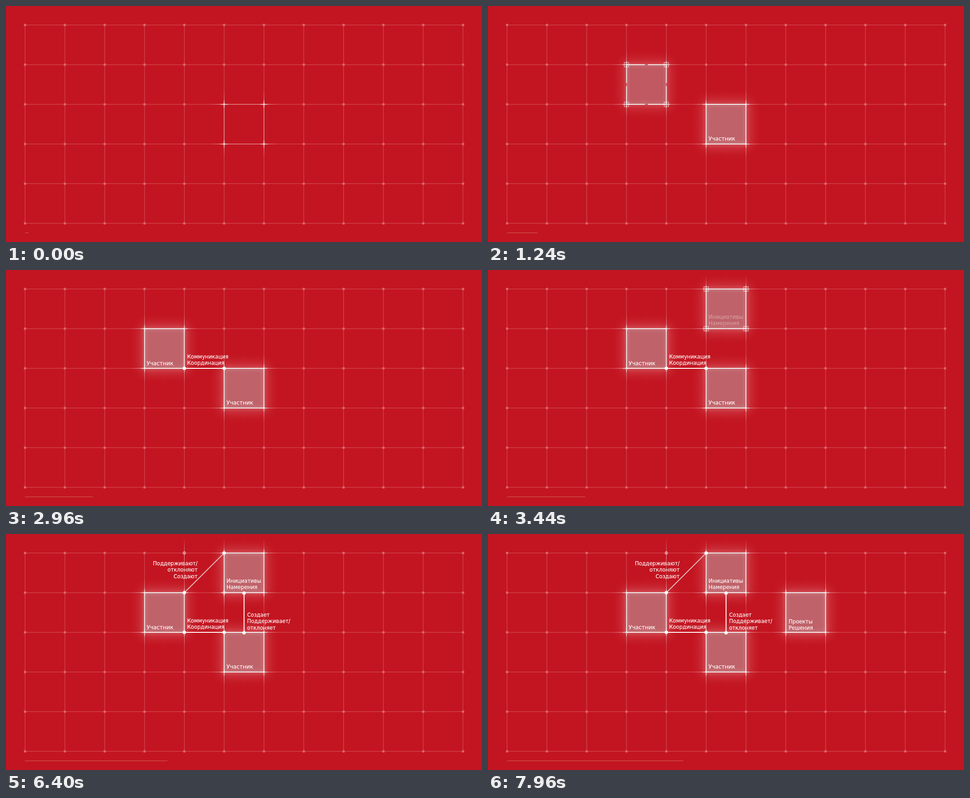
An HTML page with a canvas that plays this animation: 1061 px wide and 528 px high, repeating every 8 s.

```html
<!DOCTYPE html>
<html lang="ru">
<head>
<meta charset="utf-8">
<title>Схема</title>
<style>
  html, body { margin: 0; width: 100%; height: 100%; overflow: hidden; background: #c31521; }
  canvas { display: block; }
</style>
</head>
<body>
<canvas id="stage" width="1061" height="528"></canvas>
<script>
const ctx = document.getElementById('stage').getContext('2d');
const LOOP = 8000, STEP = 40, TAU = Math.PI * 2;
const at = n => 42 + 88.75 * n;
const ramp = (t, from, to) => Math.min(1, Math.max(0, (t - from) / (to - from)));
const ease = p => 1 - (1 - p) * (1 - p);
const white = a => `rgba(255,255,255,${a})`;

function withAlpha(alpha, draw) {
  if (alpha <= 0) return;
  ctx.save();
  ctx.globalAlpha = alpha;
  draw();
  ctx.restore();
}

function line(x1, y1, x2, y2, width, color) {
  ctx.lineWidth = width;
  ctx.strokeStyle = color;
  ctx.beginPath();
  ctx.moveTo(x1, y1);
  ctx.lineTo(x2, y2);
  ctx.stroke();
}

function dot(x, y, r) {
  ctx.fillStyle = '#fff';
  ctx.beginPath();
  ctx.arc(x, y, r, 0, TAU);
  ctx.fill();
}

function label(rows, x, y, alpha, size = 11.7, align = 'left') {
  withAlpha(alpha, () => {
    ctx.font = `${size}px "DejaVu Sans", Verdana, sans-serif`;
    ctx.textAlign = align;
    ctx.fillStyle = '#fff';
    ctx.strokeStyle = white(0.5);
    ctx.lineWidth = 0.3;
    rows.forEach((row, k) => {
      ctx.fillText(row, x, y + k * 14.5);
      ctx.strokeText(row, x, y + k * 14.5);
    });
  });
}

// Line that fades out away from a point
function tail(x, y, dx, dy) {
  const len = 34, ex = x + dx * len, ey = y + dy * len;
  const fade = ctx.createLinearGradient(x, y, ex, ey);
  fade.addColorStop(0, white(0.55));
  fade.addColorStop(1, white(0));
  line(x, y, ex, ey, 1, fade);
}

function grid() {
  const pink = 'rgba(255,225,222,0.32)';
  for (let i = 0; i < 12; i++) line(at(i), at(0), at(i), at(5), 1, pink);
  for (let j = 0; j < 6; j++) line(at(0), at(j), at(11), at(j), 1, pink);
  ctx.fillStyle = '#dc6469';
  for (let i = 0; i < 12; i++)
    for (let j = 0; j < 6; j++) ctx.fillRect(at(i) - 2.5, at(j) - 2.5, 5, 5);
}

// Only the shadow of the frame lands on the stage
function glow(x, y, size, blur, width, alpha) {
  ctx.save();
  ctx.shadowColor = `rgba(255,235,230,${alpha})`;
  ctx.shadowBlur = blur;
  ctx.shadowOffsetX = 3000;
  ctx.lineWidth = width;
  ctx.strokeStyle = '#fff';
  ctx.strokeRect(x - 3000, y, size, size);
  ctx.restore();
}

function outerGlow(x, y, size) {
  ctx.save();
  ctx.beginPath();
  ctx.rect(x - 60, y - 60, size + 120, size + 120);
  ctx.rect(x, y, size, size);
  ctx.clip('evenodd');
  glow(x, y, size, 26, 8, 0.55);
  ctx.restore();
}

// age: ms since the cell began; drawn: its outline is there from the start
function cell(i, j, age, drawn = false) {
  if (age < 0) return;
  const x = at(i), y = at(j), x2 = at(i + 1), y2 = at(j + 1), size = x2 - x;
  const fill = drawn ? ramp(age, 0, 450) : ramp(age, 40, 400);
  const reach = drawn ? 1 : ease(ramp(age, 0, 500));
  const corners = [[x, y, 1, 1], [x2, y, -1, 1], [x, y2, 1, -1], [x2, y2, -1, -1]];

  withAlpha(fill, () => {
    outerGlow(x, y, size);
    ctx.fillStyle = 'rgba(186,190,190,0.46)';
    ctx.fillRect(x, y, size, size);
    glow(x, y, size, 9, 3, 0.4);
  });

  withAlpha(drawn ? 1 : ramp(age, 0, 160), () => {
    for (const [cx, cy, sx, sy] of corners) {
      tail(cx, cy, -sx, 0);
      tail(cx, cy, 0, -sy);
      line(cx - 8, cy, cx + 8, cy, 1.5, 'rgba(235,225,222,0.75)');
      line(cx, cy - 8, cx, cy + 8, 1.5, 'rgba(235,225,222,0.75)');
    }
  });

  withAlpha(drawn ? 0.6 + 0.4 * fill : 1, () => {
    const width = drawn ? 1.2 + 0.6 * fill : 1.8;
    const half = reach * size / 2;
    for (const [cx, cy, sx, sy] of corners) {
      line(cx, cy, cx + sx * half, cy, width, '#f2f6f6');
      line(cx, cy, cx, cy + sy * half, width, '#f2f6f6');
    }
  });

  if (drawn) return;
  withAlpha(0.75 * ramp(age, 0, 120) * (1 - ramp(age, 600, 900)), () => {
    ctx.strokeStyle = '#fff';
    ctx.lineWidth = 1;
    for (const [cx, cy] of corners) ctx.strokeRect(cx - 5, cy - 5, 10, 10);
  });
}

function link(x1, y1, x2, y2, p, width = 2, color = '#fff') {
  if (p <= 0) return;
  const ex = x1 + (x2 - x1) * p, ey = y1 + (y2 - y1) * p;
  line(x1, y1, ex, ey, width, color);
  dot(x1, y1, 3.8);
  dot(ex, ey, 3.8);
}

function guide(x, y, alpha) {
  withAlpha(alpha, () => {
    tail(x, y, 0, -1);
    tail(x, y, 0, 1);
    ctx.strokeStyle = white(0.6);
    ctx.lineWidth = 1;
    ctx.beginPath();
    ctx.arc(x, y, 3.2, 0, TAU);
    ctx.stroke();
  });
}

function render(t) {
  ctx.setTransform(1, 0, 0, 1, 0, 0);
  ctx.fillStyle = '#c31521';
  ctx.fillRect(0, 0, 1061, 528);
  ctx.translate(0.5, 0.5);
  grid();
  line(42, 507, 50 + t * 0.04837, 507, 1, '#d2604f');

  cell(5, 2, t, true);
  cell(3, 1, t - 880);
  cell(5, 0, t - 2970);
  cell(7, 1, t - 6780);

  label(['Участник'], 491, 300, ramp(t, 450, 700), 12.3);
  label(['Участник'], 313, 212, ramp(t, 1300, 1500), 12.3);
  label(['Инициативы', 'Намерения'], 491, 108, ramp(t, 3380, 3550));
  label(['Проекты', 'Решения'], 669.5, 199, ramp(t, 7190, 7360));

  link(at(4), at(2), at(5), at(2), ease(ramp(t, 2160, 2500)));
  label(['Коммуникация', 'Координация'], 403.3, 197, ramp(t, 2540, 2760));

  link(at(5.5), at(2) + 1, at(5.5), at(1) + 1, ease(ramp(t, 4260, 4600)));
  label(['Создает', 'Поддерживает/', 'отклоняет'], 537, 184, ramp(t, 4600, 4820), 11.6);

  const guides = ramp(t, 5900, 6080);
  guide(at(4), at(0), guides);
  guide(at(5), at(1), guides);
  link(at(4), at(1), at(5), at(0), ease(ramp(t, 5920, 6220)), 2, '#e3bcbb');
  label(['Поддерживают/', 'отклоняют', 'Создают'], 426.5, 69, ramp(t, 6200, 6390), 11.7, 'right');
}

function tick() {
  const t = performance.now() % LOOP;
  render(Math.floor(t / STEP) * STEP);
  requestAnimationFrame(tick);
}
tick();
</script>
</body>
</html>
```
